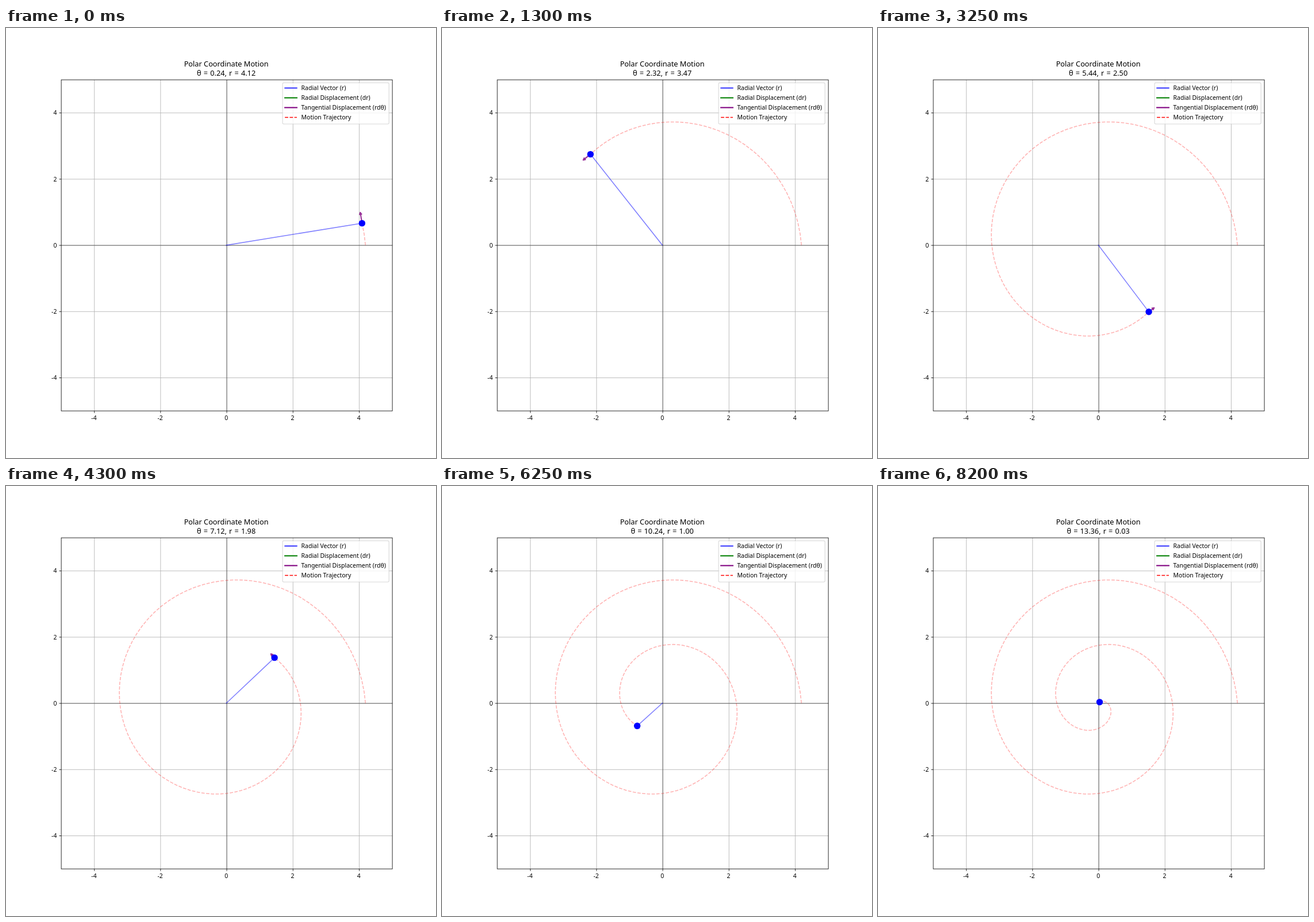
Write an HTML page that moves like this. It is 748 by 748 pixels and loops after 8.3 s.

```html
<!DOCTYPE html>
<html lang="en">
<head>
<meta charset="utf-8">
<title>Polar Coordinate Motion</title>
<style>
  html, body { margin: 0; width: 100%; height: 100%; overflow: hidden; background: #fff; }
  svg { display: block; width: 748px; height: 748px; }
  text { font: 14.05px "Noto Sans", "Open Sans", sans-serif; fill: #000; }
  .title { font-size: 17.05px; text-anchor: middle; }
  #readout { word-spacing: 1.1px; }
  .xlabel { text-anchor: middle; }
  .ylabel { text-anchor: end; }
  path, line, polyline { fill: none; }
  .grid { stroke: #b0b0b0; stroke-width: 1.11; }
  .zero { stroke: #000; stroke-width: .69; }
  .frame { fill: none; stroke: #000; stroke-width: 1.11; }
  .plot { stroke-width: 2.08; stroke-linecap: square; }
  .thick { stroke-width: 2.78; stroke-linecap: square; }
  .dashed { stroke-width: 2.08; stroke-dasharray: 7.71 3.33; }
  #arrow { stroke: purple; stroke-width: 2.78; stroke-linejoin: round; opacity: .8; }
  #trail { stroke: red; opacity: .3; stroke-linejoin: round; }
  #radius { stroke: blue; opacity: .5; }
  .legend { fill: #fff; fill-opacity: .8; stroke: #ccc; stroke-opacity: .8; stroke-width: 1.39; }
</style>
</head>
<body>
<svg viewBox="0 0 1000 1000">
  <g id="axes"></g>
  <path id="arrow"/>
  <polyline id="trail" class="dashed"/>
  <line id="radius" class="plot"/>
  <circle id="dot" r="7.64" fill="blue"/>
  <rect class="frame" x="128.5" y="120.5" width="770" height="770"/>
  <text class="title" x="512.2" y="89.9">Polar Coordinate Motion</text>
  <text class="title" id="readout" x="512.2" y="111.1"></text>
  <g id="legend">
    <rect class="legend" x="643.2" y="127.2" width="247.4" height="96" rx="2.8"/>
  </g>
</svg>
<script>
const CX = 512.5, CY = 505, UNIT = 77;
const STEP_MS = 50, LOOP_MS = 8300, LAST = 164, LEAD = 3;
const D_THETA = 0.08, D_R = 0.025;

const byId = id => document.getElementById(id);

function set(el, attrs) {
  for (const key in attrs) el.setAttribute(key, attrs[key]);
  return el;
}

function add(parent, tag, attrs, text = '') {
  const el = document.createElementNS('http://www.w3.org/2000/svg', tag);
  el.textContent = text;
  return parent.appendChild(set(el, attrs));
}

const snap = v => Math.floor(v + 0.5) + 0.5;

function drawAxes() {
  const axes = byId('axes');
  const stroke = (cls, d) => add(axes, 'path', { class: cls, d });
  for (let v = -4; v <= 4; v += 2) {
    const x = CX + v * UNIT, y = CY - v * UNIT;
    stroke('grid', `M${snap(x)} 120.5v770M128.5 ${snap(y)}h770`);
    stroke('frame', `M${snap(x)} 890.5v4.86M128.5 ${snap(y)}h-4.86`);
    add(axes, 'text', { class: 'xlabel', x, y: 911.7 }, v);
    add(axes, 'text', { class: 'ylabel', x: 118.2, y: y + 5.5 }, v);
  }
  stroke('zero', `M${snap(CX)} 120.5v770M128.5 ${snap(CY)}h770`);
}

function drawLegend() {
  const rows = [
    ['blue', 'plot', 'Radial Vector (r)'],
    ['green', 'thick', 'Radial Displacement (dr)'],
    ['purple', 'thick', 'Tangential Displacement (rdθ)'],
    ['red', 'dashed', 'Motion Trajectory']
  ];
  rows.forEach(([stroke, cls, label], i) => {
    const y = 139.6 + i * 22.75;
    add(byId('legend'), 'path', { class: cls, stroke, d: `M648.6 ${y}h27.8` });
    add(byId('legend'), 'text', { x: 686.5, y: y + 4.9 }, label);
  });
}

// The radius shrinks by repeated subtraction, which settles how ties round.
const states = [];
for (let i = 0, r = 4.2; i <= LAST + LEAD; i++, r -= D_R) {
  const theta = i * D_THETA;
  states.push({
    theta, r,
    x: CX + UNIT * r * Math.cos(theta),
    y: CY - UNIT * r * Math.sin(theta)
  });
}

function arrowPath({ theta, r, x, y }) {
  const ux = -Math.sin(theta), uy = -Math.cos(theta);
  const length = r * D_THETA * UNIT;
  const at = (along, side) =>
    `${(x + ux * along - uy * side).toFixed(2)} ${(y + uy * along + ux * side).toFixed(2)}`;
  const tip = at(length, 0), back = length - 5.56;
  return `M${x} ${y}L${tip}M${at(back, 2.78)}L${tip}L${at(back, -2.78)}`;
}

let shown = -1;

function render(step) {
  if (step === shown) return;
  shown = step;
  const next = states[step + LEAD];
  const now = states[step + LEAD - 1];
  byId('readout').textContent = `θ = ${next.theta.toFixed(2)}, r = ${next.r.toFixed(2)}`;
  set(byId('trail'), {
    points: states.slice(0, step + LEAD).map(p => `${p.x.toFixed(2)},${p.y.toFixed(2)}`).join(' ')
  });
  set(byId('radius'), { x1: CX, y1: CY, x2: now.x, y2: now.y });
  set(byId('dot'), { cx: now.x, cy: now.y });
  set(byId('arrow'), { d: arrowPath(now) });
}

drawAxes();
drawLegend();
render(0);

const start = performance.now();
function tick() {
  const t = (performance.now() - start) % LOOP_MS;
  render(Math.min(LAST, Math.floor(t / STEP_MS)));
  requestAnimationFrame(tick);
}
requestAnimationFrame(tick);
</script>
</body>
</html>
```
